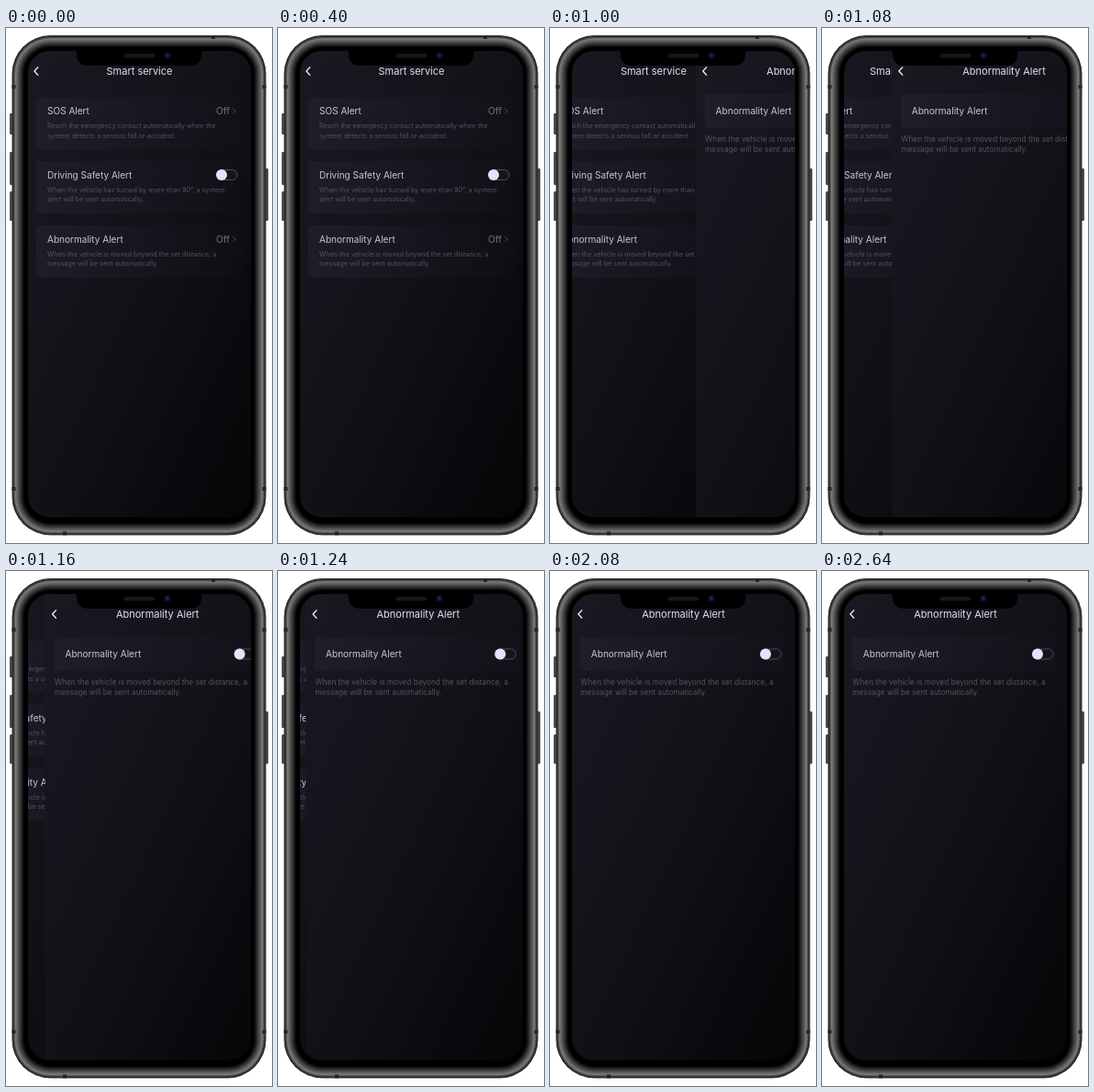
These frames come from a looping animation (290 by 561 pixels, 2.8 s). An HTML page:

```html
<!DOCTYPE html>
<html lang="en">
<head>
<meta charset="utf-8">
<title>Smart service</title>
<style>
  html, body { margin: 0; width: 100%; height: 100%; overflow: hidden; background: #fff; }
  svg { display: block; width: 100vw; height: 100vh; }
  text { font-family: Inter, "Liberation Sans", sans-serif; }
  .title { font-size: 11px; fill: #e4dff0; text-anchor: middle; }
  .row { font-size: 10.05px; fill: #cbc4da; }
  .note { font-size: 7.25px; fill: #55515e; }
  .note.large { font-size: 8.27px; }
  .state { font-size: 10.2px; fill: #77717f; }
  .line { fill: none; stroke-linecap: round; stroke-linejoin: round; }
</style>
</head>
<body>
<svg viewBox="0 0 290 561">
  <defs>
    <linearGradient id="wall" x1="0" y1="0" x2="1" y2="1">
      <stop offset="0" stop-color="#1a1922"/>
      <stop offset=".45" stop-color="#121219"/>
      <stop offset="1" stop-color="#050507"/>
    </linearGradient>
    <linearGradient id="card">
      <stop offset="0" stop-color="#25212f" stop-opacity=".6"/>
      <stop offset="1" stop-color="#1a1821" stop-opacity=".15"/>
    </linearGradient>
    <clipPath id="screen"><rect x="24" y="25" width="243" height="508" rx="24"/></clipPath>
  </defs>

  <g id="buttons" fill="#4a4a48"></g>
  <g id="frame"></g>
  <g id="bands" fill="#262625"></g>

  <g clip-path="url(#screen)">
    <g id="list"></g>
    <g id="detail"></g>
  </g>

  <path d="M72 24 Q77 24 77 28 Q77 41 90 41 H200 Q213 41 213 28 Q213 24 218 24Z" fill="#000"/>
  <rect x="128.500" y="28" width="34" height="4.500" rx="2.250" fill="#171717"/>
  <circle cx="176" cy="30" r="3.500" fill="#0a1022"/>
  <circle cx="176" cy="30" r="1.800" fill="#182d59"/>
</svg>
<script>
const LOOP = 2800, STEP = 40, PUSH = 922, WIDTH = 244.5, PARALLAX = 0.3;
const $ = id => document.getElementById(id);

const text = (cls, x, y, s) => `<text class="${cls}" x="${x}" y="${y}">${s}</text>`;
const box = (x, y, w, h, rx, extra = '') =>
  `<rect x="${x}" y="${y}" width="${w}" height="${h}" rx="${rx}" ${extra}/>`;
const line = (d, color, w) => `<path class="line" d="${d}" stroke="${color}" stroke-width="${w}"/>`;

const toggle = y =>
  box(229.5, y - 5.5, 22.5, 11, 5.5, 'fill="#15141b" stroke="#5d586b" stroke-width=".8"') +
  `<circle cx="235" cy="${y}" r="6" fill="#e8e1fb"/>`;

const off = y => text('state', 229, y + 3.7, 'Off') +
  line(`M247.6 ${y - 2.4}l2.5 2.4-2.5 2.4`, '#5c5766', 0.9);

const page = (title, body) =>
  box(23, 22, WIDTH, 519, 0, 'fill="url(#wall)"') +
  line('M34.8 42.8L30.9 47l3.9 4.2', '#f2eff8', 1.25) +
  text('title', 145.5, 51, title) + body;

const entry = (y, name, notes, control) =>
  box(33, y - 15, 224, 57, 4, 'fill="url(#card)"') +
  text('row', 45, y + 3.8, name) + control(y) +
  notes.map((s, i) => text('note', 45, y + 18.9 + i * 10.3, s)).join('');

$('list').innerHTML = page('Smart service',
  entry(90.5, 'SOS Alert', ['Reach the emergency contact automatically when the',
    'system detects a serious fall or accident.'], off) +
  entry(160, 'Driving Safety Alert', ['When the vehicle has turned by more than 90°, a system',
    'alert will be sent automatically.'], toggle) +
  entry(230, 'Abnormality Alert', ['When the vehicle is moved beyond the set distance, a',
    'message will be sent automatically.'], off));

$('detail').innerHTML = page('Abnormality Alert',
  box(33, 72, 224, 37, 4, 'fill="url(#card)"') +
  text('row', 44.8, 94.2, 'Abnormality Alert') + toggle(90.5) +
  text('note large', 33.3, 124.2, 'When the vehicle is moved beyond the set distance, a') +
  text('note large', 33.3, 135.4, 'message will be sent automatically.'));

$('buttons').innerHTML = [[4, 93, 23], [4, 135, 36], [4, 178, 32], [282, 153, 57]]
  .map(([x, y, h]) => box(x, y, 4, h, 1.2)).join('');

// Metal rim: brightest near the outer edge, fading inwards to the black bezel
const PEAK = 3.5, FADE = 9.5;
const rim = d => d < PEAK ? 40 + 85 * (d / PEAK) ** 2 : 125 * (1 - (d - PEAK) / FADE);
$('frame').innerHTML = Array.from({ length: 27 }, (_, i) => {
  const d = i / 2, v = Math.max(0, Math.round(rim(d)));
  return box(6.5 + d, 8 + d, 277 - 2 * d, 544.5 - 2 * d, 42 - d, `fill="rgb(${v},${v},${v})"`);
}).join('');

$('bands').innerHTML = [62, 500].map(y => box(6.5, y, 4, 4, 0) + box(279.5, y, 4, 4, 0)).join('') +
  box(224, 8, 4, 4, 0) + box(62, 548.5, 4, 4, 0);

// Overdamped spring: share of the push still to travel
function remaining(ms) {
  if (ms <= 0) return 1;
  const s = ms / 1000, fast = 34, slow = 12.5;
  return (fast * Math.exp(-slow * s) - slow * Math.exp(-fast * s)) / (fast - slow);
}

function draw(ms) {
  const t = Math.floor(ms / STEP) * STEP;
  const left = t > 1640 ? 0 : remaining(t - PUSH);
  $('list').setAttribute('transform', `translate(${-(1 - left) * WIDTH * PARALLAX} 0)`);
  $('detail').setAttribute('transform', `translate(${left * WIDTH} 0)`);
  $('detail').setAttribute('visibility', left < 1 ? 'visible' : 'hidden');
}

const start = performance.now();
function tick() {
  draw((performance.now() - start) % LOOP);
  requestAnimationFrame(tick);
}
tick();
</script>
</body>
</html>
```
